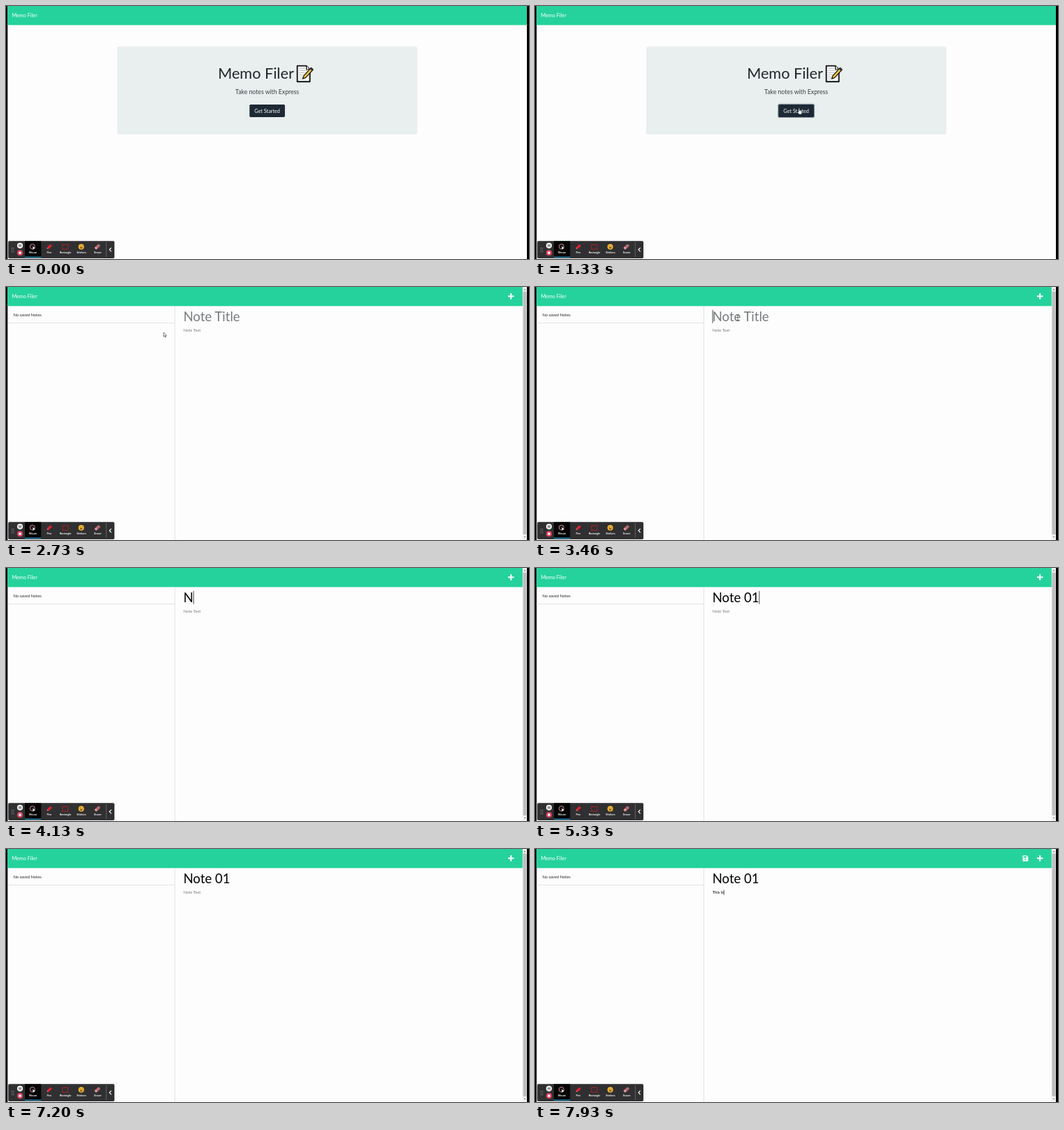
An HTML page for the animation above (8000 ms loop, 748 by 362 pixels).

```html
<!DOCTYPE html>
<html lang="en">
<head>
<meta charset="utf-8">
<title>Memo Filer</title>
<style>
  html, body { margin: 0; width: 100%; height: 100%; overflow: hidden; background: #000; }
  svg { display: block; width: 748px; height: 362px; font-family: Lato, "Open Sans", sans-serif; }
  text { white-space: pre; }
  .brand { font-size: 7.25px; fill: #fff; }
  .small { font-size: 5.8px; }
  .title { font-size: 18.55px; }
  .mid { text-anchor: middle; }
  .label { font-size: 3.8px; font-weight: 700; fill: #fff; text-anchor: middle; }

  .cut { animation: 8s step-end infinite; }
  #home { animation-name: home; }
  #notes { animation-name: notes; }
  #empty { animation-name: empty; }
  #ring { animation-name: ring; }
  #save { animation-name: save; }
  #arrow { animation-name: arrow; }
  #hand { animation-name: hand; }
  #beam { animation-name: beam; }
  #pointer { animation: move 8s ease-in-out infinite; }

  @keyframes home { 0% { opacity: 1 } 21.625%, 100% { opacity: 0 } }
  @keyframes notes { 0% { opacity: 0 } 21.625%, 100% { opacity: 1 } }
  @keyframes empty { 0% { opacity: 0 } 22.5%, 100% { opacity: 1 } }
  @keyframes ring { 0% { opacity: 0 } 15.75%, 100% { opacity: 1 } }
  @keyframes save { 0% { opacity: 0 } 90.9%, 100% { opacity: 1 } }
  @keyframes arrow {
    0% { opacity: 0 } 10.75% { opacity: 1 } 13.5% { opacity: 0 }
    21.625% { opacity: 1 } 39.5%, 100% { opacity: 0 }
  }
  @keyframes hand { 0% { opacity: 0 } 13.5% { opacity: 1 } 21.625%, 100% { opacity: 0 } }
  @keyframes beam { 0% { opacity: 0 } 39.5% { opacity: 1 } 50.75%, 100% { opacity: 0 } }
  @keyframes move {
    0%, 10.75% { transform: translate(428px, 196px) }
    15%, 25% { transform: translate(377px, 146px) }
    33.25%, 37% { transform: translate(225px, 65px) }
    41.25%, 100% { transform: translate(290px, 44px) }
  }
</style>
</head>
<body>
<svg viewBox="0 0 748 362">
  <rect x="2.3" width="742.7" height="362" fill="#fdfdfd"/>
  <rect x="2.3" width="742.7" height="27.3" fill="#25d29c"/>
  <text class="brand" x="8.4" y="16.2">Memo Filer</text>

  <g id="home" class="cut">
    <rect x="159" y="58.3" width="429.2" height="125.2" rx="2" fill="#e9eeee"/>
    <text x="303.2" y="104.2" font-size="21.65" fill="#212529">Memo Filer</text>
    <g stroke-linejoin="round" stroke-linecap="round">
      <path d="M416.6 85.6H429.5L434.6 90.8V108.2H416.6Z" fill="#fff" stroke="#111" stroke-width="1.9"/>
      <path d="M429.5 85.6V90.8H434.6" fill="#ddd" stroke="#111" stroke-width="1.1"/>
      <path d="M419.5 89.6H427M419.5 92.6H431M419.5 95.6H430M419.5 98.6H427M419.5 101.6H424M419.5 104.6H423"
            stroke="#b4b8b8" stroke-width="1"/>
      <path d="M424.3 104.3L426 99.8L436.3 88.3L439.2 91L428.8 102.4Z" fill="#f6c945" stroke="#111" stroke-width="1.2"/>
      <path d="M434.7 90.1L436.3 88.3L439.2 91L437.5 92.8Z" fill="#333"/>
      <path d="M424.3 104.3L425.1 102.2L426.4 103.4Z" fill="#111"/>
    </g>
    <text class="mid" x="373.6" y="126.4" font-size="8.7" fill="#3a3f44">Take notes with Express</text>
    <rect id="ring" class="cut" x="347.2" y="139.8" width="52.8" height="20.2" rx="2.6" fill="#8f9ba7"/>
    <rect x="348.3" y="140.9" width="50.6" height="18" rx="1.6" fill="#1d2935"/>
    <text class="brand mid" x="373.6" y="152.5">Get Started</text>
  </g>

  <g id="notes" class="cut">
    <path d="M2.3 51.5H241.5M241.5 27.3V362" fill="none" stroke="#dee0e2" stroke-width=".9"/>
    <g id="empty" class="cut">
      <text class="small" x="10.4" y="41.8" fill="#212529">No saved Notes</text>
    </g>
    <text id="title" class="title" x="253.7" y="49"></text>
    <text id="body" class="small" x="253.7" y="64.1"></text>
    <rect id="caret" width=".7" fill="#000"/>
    <path d="M722.2 9V17.4M718 13.2H726.4" stroke="#fff" stroke-width="2"/>
    <g id="save" class="cut">
      <path d="M698.2 9.2H703.2L705.4 11.4V16.6Q705.4 17.4 704.6 17.4H698.2Q697.4 17.4 697.4 16.6V10Q697.4 9.2 698.2 9.2Z" fill="#fff"/>
      <path d="M698.6 10.4H702.9V12.5H698.6Z" fill="#25d29c"/>
      <circle cx="701.4" cy="14.9" r="1.15" fill="#25d29c"/>
    </g>
    <rect x="738.8" width="6.2" height="362" fill="#f1f1f1"/>
    <rect x="739.5" y="6.5" width="5" height="347.5" fill="#bdbdbd"/>
    <path d="M740.6 4.2L742 2.6L743.4 4.2ZM740.6 357L742 358.6L743.4 357Z" fill="#666"/>
  </g>

  <g id="toolbar">
    <rect x="3.2" y="336.2" width="151.9" height="24.8" rx="1.8" fill="#303032"/>
    <rect x="27" y="336.4" width="23.2" height="23.6" fill="#050505"/>
    <rect x="27" y="358.8" width="23.2" height="1.2" fill="#2aa3d8"/>
    <path d="M8.6 346V352.5M10.8 346V352.5" stroke="#aaa" stroke-width="1" stroke-dasharray="1 1.6"/>
    <circle cx="20" cy="342.8" r="4.1" fill="#f2f2f2"/>
    <path d="M18.9 341.1V344.5M21.1 341.1V344.5" stroke="#333" stroke-width="1"/>
    <circle cx="20" cy="353.2" r="4.1" fill="#d9415c"/>
    <rect x="18.4" y="351.6" width="3.2" height="3.2" rx=".5" fill="#fff"/>
    <circle cx="37.8" cy="344.2" r="3.5" fill="none" stroke="#e7a3ab" stroke-width=".9"/>
    <path d="M38.2 343.4L42 346.9L40 347.1L38.7 348.7Z" fill="#fff"/>
    <g transform="rotate(-42 61.7 344.7)">
      <path d="M57.6 344.7L59.4 343.2V346.2Z" fill="#ef8b90"/>
      <rect x="59.2" y="343" width="6.6" height="3.4" rx=".7" fill="#e0222f"/>
    </g>
    <rect x="80.8" y="341.4" width="8" height="6.6" fill="none" stroke="#b3202b" stroke-width=".9"/>
    <circle cx="107.6" cy="344.6" r="4" fill="#f4bd35"/>
    <path d="M105.3 345.2Q107.6 349 109.9 345.2Z" fill="#6b3b14"/>
    <circle cx="106.1" cy="343.4" r=".6" fill="#6b3b14"/>
    <circle cx="109.1" cy="343.4" r=".6" fill="#6b3b14"/>
    <g transform="rotate(-42 130.6 344.6)">
      <rect x="126.5" y="342.8" width="8.2" height="3.6" rx=".8" fill="#e79aa4"/>
      <rect x="129.3" y="342.8" width="5.4" height="3.6" rx=".6" fill="#b9646f"/>
    </g>
    <text class="label" x="38.6" y="354.4">Mouse</text>
    <text class="label" x="61.7" y="354.4">Pen</text>
    <text class="label" x="85" y="354.4">Rectangle</text>
    <text class="label" x="108" y="354.4">Stickers</text>
    <text class="label" x="131.2" y="354.4">Eraser</text>
    <path d="M143.3 338V359" stroke="#777" stroke-width=".7"/>
    <path d="M150.6 345.9L148 348.6L150.6 351.3" fill="none" stroke="#fff" stroke-width="1.2"/>
  </g>

  <g id="pointer" stroke-linejoin="round">
    <path id="arrow" class="cut" d="M.4 0V6L1.8 4.8L2.8 7L3.8 6.5L2.8 4.4H4.7Z" fill="#fff" stroke="#222" stroke-width=".6"/>
    <path id="hand" class="cut" d="M0 .6Q.7 -.4 1.4 .6V3.6L4.2 4.3Q4.9 4.6 4.8 5.4L4.2 9H.7L-1.5 6Q-1.3 5 0 5.8Z" fill="#fff" stroke="#111" stroke-width=".5"/>
    <path id="beam" class="cut" d="M-1.2 -3.5H1.2M0 -3.5V3.5M-1.2 3.5H1.2" stroke="#222" stroke-width=".6"/>
  </g>
</svg>
<script>
  const LOOP = 8000, BLINK = 500;
  const $ = id => document.getElementById(id);
  const caret = $("caret");

  // focus and blur times, then the moment each character is typed
  const fields = [
    { el: $("title"), hint: "Note Title", text: "Note 01", focus: 3400, blur: 6300,
      keys: [4060, 4270, 4410, 4600, 4800, 5060, 5260], top: 32.8, height: 19 },
    { el: $("body"), hint: "Note Text", text: "This Is", focus: 6300, blur: LOOP,
      keys: [7270, 7340, 7410, 7540, 7610, 7750, 7870], top: 58.6, height: 7 }
  ];

  function show(field, t) {
    const typed = field.keys.filter(k => k <= t);
    const n = typed.length;
    const value = n ? field.text.slice(0, n) : field.hint;
    if (field.el.textContent !== value) field.el.textContent = value;
    field.el.setAttribute("fill", n ? "#000" : "#777b7d");
    if (t < field.focus || t >= field.blur) return false;

    const since = t - (n ? typed[n - 1] : field.focus);
    const width = n ? field.el.getComputedTextLength() : 0;
    caret.setAttribute("x", 253.7 + width);
    caret.setAttribute("y", field.top);
    caret.setAttribute("height", field.height);
    return Math.floor(since / BLINK) % 2 === 0;
  }

  let start;
  function tick(now) {
    start ??= now;
    const t = (now - start) % LOOP;
    const lit = fields.map(f => show(f, t)).some(Boolean);
    caret.setAttribute("opacity", lit ? 1 : 0);
    requestAnimationFrame(tick);
  }
  requestAnimationFrame(tick);
</script>
</body>
</html>
```
